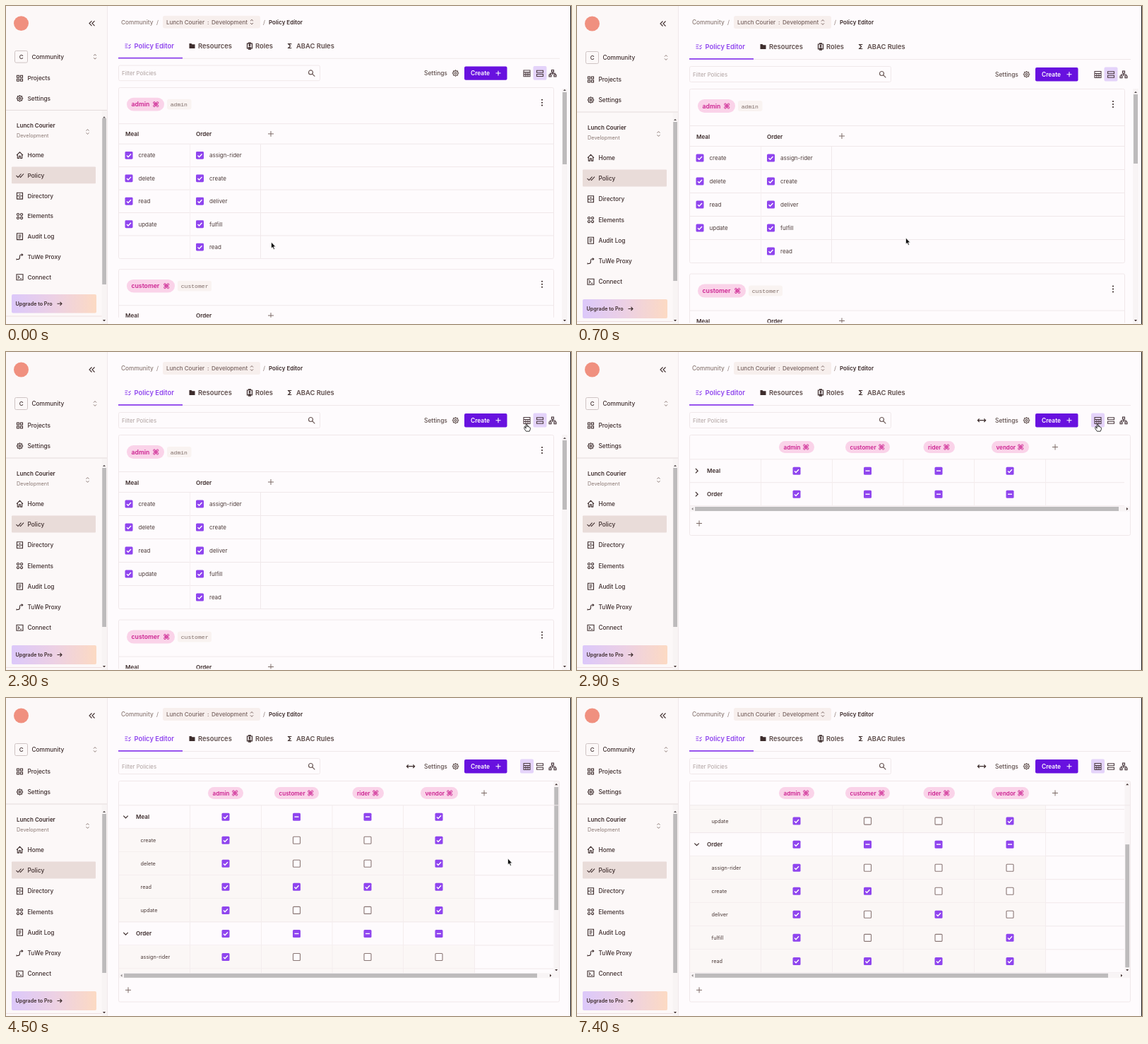
An HTML page for the animation above (8000 ms loop, 800 px wide and 450 px high).

```html
<!DOCTYPE html>
<html lang="en">
<head>
<meta charset="utf-8">
<title>Policy editor</title>
<style>
html, body { margin: 0; width: 100%; height: 100%; overflow: hidden; background: #fefbfd; }
svg { display: block; width: 100vw; height: 100vh; }
text { font-family: Inter, "Open Sans", sans-serif; white-space: pre; }
.mono { font-family: "Liberation Mono", "DejaVu Sans Mono", monospace; }
</style>
</head>
<body>
<svg id="stage" viewBox="0 0 800 450" xmlns="http://www.w3.org/2000/svg"></svg>
<script>
const INK = '#3d2c2c', SOFT = '#8b7974', LINE = '#f0e8ea', PAGE = '#fefbfd';
const PURPLE = '#8f45ee', PINK = '#fad3e9', MAGENTA = '#cc2291', THUMB = '#bdbbbc';

// Drawing helpers, each returns SVG markup
const text = (x, y, s, size = 8.3, weight = 500, fill = INK, more = '') =>
  `<text x="${x}" y="${y}" font-size="${size}" font-weight="${weight}" fill="${fill}" ${more}>${s}</text>`;
const rect = (x, y, w, h, fill, r = 0, more = '') =>
  `<rect x="${x}" y="${y}" width="${w}" height="${h}" rx="${r}" fill="${fill}" ${more}/>`;
const frame = (x, y, w, h, r = 2, color = LINE) => rect(x, y, w, h, 'none', r, `stroke="${color}"`);
const icon = (x, y, d, color = INK, width = 1.1) =>
  `<path transform="translate(${x} ${y})" d="${d}" fill="none" stroke="${color}" stroke-width="${width}"/>`;
const solid = (x, y, d, color = INK) =>
  `<path transform="translate(${x} ${y})" d="${d}" fill="${color}"/>`;
const hline = (x1, x2, y, color = LINE) => icon(x1, y, `M0 0H${x2 - x1}`, color, 1);
const vline = (x, y1, y2, color = LINE) => icon(x, y1, `M0 0V${y2 - y1}`, color, 1);
const group = (id, body, more = '') => `<g id="${id}" ${more}>${body}</g>`;
const dot = (x, y, r) => `M${x - r} ${y}a${r} ${r} 0 1 0 ${2 * r} 0a${r} ${r} 0 1 0 ${-2 * r} 0`;
const quad = make => [[-1, -1], [1, -1], [-1, 1], [1, 1]].map(([x, y]) => make(x, y)).join('');

const UPDOWN = 'M-2-1.4L0-3.4L2-1.4M-2 1.4L0 3.4L2 1.4';
const PLUS = 'M-4 0H4M0-4V4';
const CLOVER = quad((x, y) => dot(x * 2.2, y * 2.2, 1.4)) + 'M-1-2V2M1-2V2M-2-1H2M-2 1H2';
const ARROW_RIGHT = 'M-3.5 0H3M.5-2.5L3 0L.5 2.5';
const GEAR = dot(0, 0, 3.5) + dot(0, 0, 1.4) +
  Array.from({ length: 8 }, (_, i) => {
    const a = i * Math.PI / 4, c = Math.cos(a), s = Math.sin(a);
    return `M${c * 3.5} ${s * 3.5}L${c * 4.8} ${s * 4.8}`;
  }).join('');
const GRID = quad((x, y) => `M${x * 2.5 - 1.5} ${y * 2.5 - 1.5}h3v3h-3z`);
const RINGS = quad((x, y) => dot(x * 2.5, y * 2.5, 1.6));
const HOUSE = 'M-4.5 0L0-4.5L4.5 0M-3.2-1V4.3H-1V1H1V4.3H3.2V-1';
const CHECKS = 'M-5 0L-2.5 2.5L2-2.5M0 1.5L1 2.5L5.5-2.5';
const DRAWERS = 'M-4-4.5H4V4.5H-4ZM-4 0H4M-1-2.2H1M-1 2.2H1';
const NOTE = 'M-4-4.5H4V4.5H-4ZM-2-2H2M-2 0H2M-2 2H1';
const ROUTE = 'M-4 3.5H-2Q0 3.5 0 0T2-3H4M2.5-4.5L4.3-3L2.5-1.4M-4.4 2.5V4.5';
const TERMINAL = 'M-4.5-4H4.5V4H-4.5ZM-2.5-2L-.7 0L-2.5 2M.3 2H2.6';

function checkbox(x, y, state) {
  if (state === '0') return rect(x - 5, y - 5, 10, 10, PAGE, 1, `stroke="#8a7775" stroke-width="1.1"`);
  const mark = state === '1' ? 'M-3 .2L-1 2.3L3-2' : 'M-3 0H3';
  return rect(x - 5.5, y - 5.5, 11, 11, PURPLE, 1.5) + icon(x, y, mark, '#fff', 1.4);
}

function rolePill(x, y, w, h, name, size) {
  return rect(x, y, w, h, PINK, h / 2) +
    text(x + 6.5, y + h / 2 + 3, name, size, 600, MAGENTA) +
    icon(x + w - 11.8, y + h / 2, CLOVER, MAGENTA, .9);
}

function sidebar() {
  const menu = [['Home', HOUSE], ['Policy', CHECKS], ['Directory', DRAWERS], ['Elements', RINGS],
    ['Audit Log', NOTE], ['TuWe Proxy', ROUTE], ['Connect', TERMINAL]];
  return rect(0, 0, 143, 470, '#fcf8f8') + vline(143.5, 0, 470) +
    `<circle cx="21.5" cy="25" r="10.5" fill="#f0907f"/>` +
    icon(121.5, 25, 'M0-3.5L-3.5 0L0 3.5M4-3.5L.5 0L4 3.5') +
    frame(12.5, 64.5, 18, 17, 2, '#cfc4c4') + text(18.7, 75.8, 'C', 8, 500) +
    text(36.5, 76, 'Community') + icon(126, 73, UPDOWN, SOFT, 1) +
    icon(19.5, 104, GRID) + text(30.5, 107, 'Projects') +
    icon(19.5, 133, GEAR) + text(30.5, 136, 'Settings') +
    hline(0, 143, 150, '#e4dbdb') +
    text(15, 175.3, 'Lunch Courier', 8, 600) + text(15, 189, 'Development', 7.3, 400, SOFT) +
    icon(115.5, 181, UPDOWN, SOFT, 1) +
    rect(8, 231.5, 119, 24, '#e9dcd9', 1) +
    menu.map(([name, shape], i) => {
      const y = 214.8 + i * 29.25;
      return icon(19.5, y, shape) + text(30.5, y + 3, name);
    }).join('') +
    rect(8, 415, 120, 27, 'url(#promo)', 2) +
    text(13.5, 431.2, 'Upgrade to Pro', 7.2, 600) + icon(76, 428.5, ARROW_RIGHT) +
    hline(0, 143, 446.5, '#eedfe0') + rect(135.5, 151, 7.5, 320, '#f8f4f4');
}

function header() {
  return text(163, 26, 'Community', 8.3, 500, SOFT) + text(213, 26, '/', 8.3, 400, SOFT) +
    rect(222, 14, 138, 18, '#f7efed', 3) +
    text(227, 26, 'Lunch Courier', 8, 500, '#77625f') + text(285, 26, ':', 8, 500, '#77625f') +
    text(291, 26, 'Development', 8.1, 500, '#77625f') + icon(348, 23, UPDOWN, '#77625f', 1) +
    text(364, 26, '/', 8.3, 400, SOFT) + text(372, 26, 'Policy Editor', 8, 600) +
    icon(172.5, 57.5, 'M-4-2.5H0M-4 0H-1M-4 2.5H0M1-1L2-.2L4-2.5M1 2.4L2 3.2L4 1', PURPLE) +
    text(181.5, 60.8, 'Policy Editor', 9.4, 600, PURPLE) +
    solid(263.5, 57.5, 'M-4-3.5H-1L0-2.3H4V3.5H-4Z') + text(272, 60.8, 'Resources', 9.4, 600, '#5d4c4a') +
    icon(345, 57.5, 'M-3.5-3.5H3.5V3.5H-3.5ZM-2-4.6H2M-2 4.6H2', INK, 1.2) +
    solid(345, 57.5, dot(0, -1, 1.5) + 'M-3 3Q0-1 3 3Z') + text(353, 60.8, 'Roles', 9.4, 600, '#5d4c4a') +
    icon(402, 57.5, 'M2.3-3H-2.2L.6 0L-2.2 3H2.3', INK, 1.2) + text(411, 60.8, 'ABAC Rules', 9.4, 600, '#5d4c4a') +
    hline(159, 784, 75.5) + rect(159, 74, 91, 1.8, PURPLE) +
    frame(159.5, 85.5, 285, 22) + text(164, 99.8, 'Filter Policies', 7.8, 400, '#aea19f') +
    icon(432.5, 96.5, dot(-1, -1, 3) + 'M1.2 1.2L4.8 4.8', '#6b5856', 1.2) +
    text(592, 99.8, 'Settings', 8.4, 500, '#5d4c4a') + icon(636.5, 96.7, GEAR, '#5d4c4a') +
    rect(649, 87, 60.5, 19.5, '#6811df', 2) + text(658, 99.8, 'Create', 8.4, 600, '#fff') +
    icon(697, 96.7, 'M-3.5 0H3.5M0-3.5V3.5', '#fff', 1.1) +
    rect(0, 86.5, 19, 20, '#e4d3fa', 2, 'id="viewMark"') +
    icon(737.5, 97, 'M-4.5-4.5H4.5V4.5H-4.5ZM-4.5-1.5H4.5M-4.5 1.5H4.5M-1.5-1.5V4.5M1.5-1.5V4.5', '#4d3c42') +
    icon(756, 97, 'M-4.5-4.2H4.5V-1.2H-4.5ZM-4.5 1.2H4.5V4.2H-4.5Z', '#4d3c42') +
    icon(774, 97, 'M-1.5-4.8H1.5V-2H-1.5ZM0-2V2M-3.5 2V0H3.5V2M-5 2H-2V4.6H-5ZM2 2H5V4.6H2Z', '#4d3c42', 1.2);
}

function card(top, height, name, pillWidth, chipX, chipWidth) {
  return frame(159.5, top, 616, height) + rolePill(171, top + 14.5, pillWidth, 19, name, 8.7) +
    rect(chipX, top + 16.5, chipWidth, 15, '#f9f3f1', 3) +
    text(chipX + 4.7, top + 27.3, name, 8.1, 400, '#7d6a66', 'class="mono"') +
    solid(759, top + 21.5, dot(0, -4, 1.05) + dot(0, 0, 1.05) + dot(0, 4, 1.05)) +
    hline(160, 775, top + 52) +
    text(169, top + 70, 'Meal', 8.1, 600) + text(269, top + 70, 'Order', 8.1, 600) +
    icon(375, top + 66.5, PLUS, '#7d6a66', 1);
}

function listView() {
  const columns = [[174, ['create', 'delete', 'read', 'update']],
    [274.5, ['assign-rider', 'create', 'deliver', 'fulfill', 'read']]];
  const lines = [0, 1, 2, 3, 4].map(i => hline(160, 775, 198.5 + i * 33)).join('');
  const cells = columns.map(([x, names]) => names.map((name, i) =>
    checkbox(x, 215 + i * 33, '1') + text(x + 13.5, 218 + i * 33, name, 8, 400, '#4d3c3a')).join('')).join('');
  return lines + vline(260.5, 199, 363, '#f6f0f1') + vline(360.5, 199, 363) + cells +
    card(117.5, 246, 'admin', 53, 228, 34.5) + card(379, 120, 'customer', 68, 243, 48) +
    rect(159, 448.3, 618, 20, PAGE);
}

const COLUMNS = [311, 411.5, 512, 613];
const rowY = i => 168.2 + i * 33.05;

function tableRow(i, name, states, open) {
  const y = rowY(i), child = open === undefined;
  const chevron = open ? 'M-3.2-1.6L0 1.6L3.2-1.6' : 'M-1.6-3.2L1.6 0L-1.6 3.2';
  return (child ? rect(160, y - 16.5, 503, 33, '#fbf7f6') + text(190.5, y + 2.7, name, 7.3, 400, '#4d3c3a')
    : icon(169.5, y, chevron, INK, 1.2) + text(184, y + 3, name, 8.1, 600)) +
    hline(160, 775, y + 16.5) +
    [260.5, 361.5, 462, 562.5, 663.5].map(x => vline(x, y - 16.5, y + 16.5, '#f4edee')).join('') +
    COLUMNS.map((x, c) => checkbox(x, y, states[c])).join('');
}

function tableShell(bottom, scrollY, thumbEnd, tipX) {
  return frame(159.5, 117.5, 624, bottom - 117.5) +
    rect(160, scrollY - 3.5, 623, 7, '#f8f4f5') + rect(167, scrollY - 3, thumbEnd - 167, 6, THUMB) +
    solid(163.5, scrollY, 'M-1.3 0L1-2V2Z', '#8a8586') + solid(tipX, scrollY, 'M1.3 0L-1-2V2Z', INK) +
    icon(173, scrollY + 20.5, PLUS, '#7d6a66', 1);
}

function tableView() {
  const pills = [['admin', 286, 50], ['customer', 380, 63], ['rider', 490.5, 44.5], ['vendor', 587, 53]];
  const rows = [['Meal', '1--1', true], ['create', '1001'], ['delete', '1001'], ['read', '1111'],
    ['update', '1001'], ['Order', '1---', true], ['assign-rider', '1000'], ['create', '1100'],
    ['deliver', '1010'], ['fulfill', '1001'], ['read', '1111']];
  return icon(573, 96.7, 'M-5.5 0H5.5M-3.3-2.3L-5.6 0L-3.3 2.3M3.3-2.3L5.6 0L3.3 2.3M-1 0', INK, 1.2) +
    pills.map(([name, x, w]) => rolePill(x, 126, w, 17, name, 8.1)).join('') +
    icon(677, 134.5, PLUS, '#7d6a66', 1) +
    group('collapsed', tableRow(0, 'Meal', '1--1', false) + tableRow(1, 'Order', '1---', false) +
      tableShell(259.5, 222, 767, 779)) +
    group('expanded', `<g clip-path="url(#body)">${group('rows', rows.map((r, i) => tableRow(i, ...r)).join(''))}</g>` +
      rect(775.5, 118, 7.5, 271, '#f8f4f5') + rect(776.3, 0, 5.8, 174, THUMB, 0, 'id="rowThumb"') +
      solid(779.2, 122.3, 'M0-1.3L2 1H-2Z', INK) + solid(779.2, 385, 'M0 1.3L2-1H-2Z', INK) +
      tableShell(430, 392.8, 752, 771)) +
    hline(160, 783, 151.8);
}

const tipUp = id => `<path id="${id}" d="M0-1.3L2 1H-2Z" fill="#5a5254"/>`;
const tipDown = x => solid(x, 445, 'M0 1.3L2-1H-2Z', INK);

document.getElementById('stage').innerHTML =
  `<defs><linearGradient id="promo"><stop stop-color="#dcc8fa"/><stop offset=".5" stop-color="#ecd0e4"/>
   <stop offset="1" stop-color="#fcdac3"/></linearGradient>
   <clipPath id="body"><rect x="160" y="152" width="615" height="237"/></clipPath></defs>` +
  rect(0, 0, 800, 450, PAGE) +
  group('ui', sidebar() + header() + group('list', listView()) + group('table', tableView())) +
  rect(136.2, 0, 5.8, 0, THUMB, 0, 'id="sideThumb"') + tipUp('sideTip') + tipDown(139) +
  group('pageBar', rect(787, 117, 8, 333, '#f8f4f5') + rect(788, 0, 6, 0, THUMB, 0, 'id="pageThumb"') +
    tipUp('pageTip') + tipDown(791)) +
  rect(799, 0, 1, 450, '#1a1718') +
  group('arrow', `<path d="M0 0V9L2 7.2L3.5 10.4L5 9.7L3.6 6.7H6.4Z" fill="#111" stroke="#fff" stroke-width=".7"/>`) +
  group('hand', `<path d="M-.9.6Q0-.6.9.6V3.7Q2-.1 2.6 4Q3.8 3.2 4.1 4.6Q5.2 4.2 5.3 5.4V7.5L4.2 10.2H-.6L-3.2 6.4Q-3-.1 -.9 6.2Z"
    fill="#fff" stroke="#222" stroke-width=".9"/>`);

const part = Object.fromEntries([...document.querySelectorAll('#stage [id]')].map(e => [e.id, e]));
const show = (el, on) => el.setAttribute('display', on ? 'inline' : 'none');
const place = (el, x, y) => el.setAttribute('transform', `translate(${x} ${y})`);
const span = (el, top, bottom) => { el.setAttribute('y', top); el.setAttribute('height', bottom - top); };

// Pointer stops: time, x, y
const PATH = [[400, 375.5, 334], [700, 465.5, 328], [800, 482, 326], [900, 482, 326], [1800, 690, 165],
  [2300, 737, 102], [3800, 737, 102], [3900, 730, 127], [4500, 710.5, 227]];

function pointerAt(t) {
  const next = PATH.findIndex(p => p[0] > t);
  if (next < 0) return PATH.at(-1).slice(1);
  if (next === 0) return PATH[0].slice(1);
  const [a, b] = [PATH[next - 1], PATH[next]], f = (t - a[0]) / (b[0] - a[0]);
  return [a[1] + (b[1] - a[1]) * f, a[2] + (b[2] - a[2]) * f];
}

function render(time) {
  const t = Math.floor(time / 100) * 100;
  const squash = Math.max(0, 1 - t / 200);
  const isTable = t >= 2900, isOpen = t >= 3100;
  const scroll = t < 5700 ? 0 : t < 5800 ? 41 : 126.3;

  part.ui.setAttribute('transform', `scale(1 ${1 - .0168 * squash})`);
  span(part.sideThumb, 164 - 5 * squash, 389 + 5 * squash);
  place(part.sideTip, 139, 161 - 3.5 * squash);
  span(part.pageThumb, 125 - 3 * squash, 223 + squash);
  place(part.pageTip, 791, 122 - 3 * squash);

  show(part.list, !isTable);
  show(part.pageBar, !isTable);
  show(part.table, isTable);
  show(part.collapsed, !isOpen);
  show(part.expanded, isOpen);
  part.viewMark.setAttribute('x', isTable ? 728 : 746.5);
  place(part.rows, 0, -scroll);
  part.rowThumb.setAttribute('y', 126 + scroll * .643);

  const [x, y] = pointerAt(t), isHand = y < 107;
  place(part.arrow, x, y);
  place(part.hand, x, y);
  show(part.hand, isHand);
  show(part.arrow, !isHand && t < 6400);
}

function tick() {
  render(performance.now() % 8000);
  requestAnimationFrame(tick);
}
tick();
</script>
</body>
</html>
```
